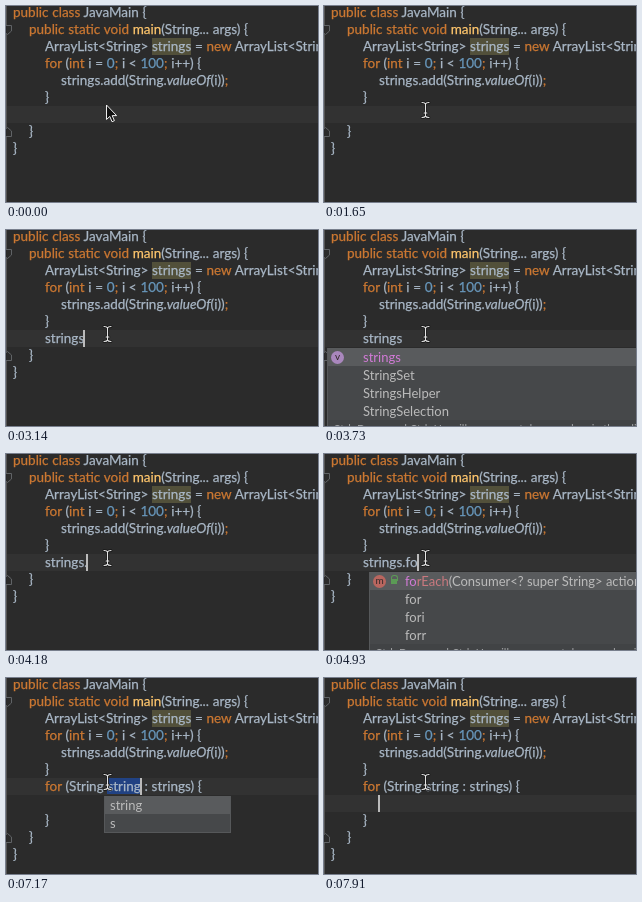
These frames come from a looping animation (312 by 196 pixels, 8 s). An HTML page:

```html
<!DOCTYPE html>
<html lang="en">
<head>
<meta charset="utf-8">
<title>Editor: postfix completion</title>
<style>
html, body { margin: 0; width: 100%; height: 100%; overflow: hidden; background: #2b2b2b; }
#stage { position: absolute; left: 0; top: 0; width: 312px; height: 196px; overflow: hidden; background: #2b2b2b; }
#stage * { box-sizing: border-box; }
#band { position: absolute; left: 0; width: 312px; height: 17px; background: #323232; }
.row { position: absolute; height: 17px; white-space: pre; color: #a9b7c6;
  font: 13.5px/17px Lato, "Open Sans", sans-serif; word-spacing: .25px; -webkit-text-stroke: .25px; }
.kw { color: #cc7832; }
.num { color: #6897bb; }
.fn { color: #ffc66d; }
.str { color: #6a8759; }
.hl { background: #52503a; display: inline-block; height: 17px; vertical-align: top; }
.sel { background: #214283; }
.caret { display: inline-block; position: relative; width: 0; height: 17px; vertical-align: top; }
.caret::after { content: ""; position: absolute; left: -1px; top: 0; width: 2px; height: 17px; background: #bbb; }
svg { position: absolute; left: 0; top: 0; }
.list { position: absolute; top: 118px; width: 340px; background: #46484a; border: 1px solid #56585a;
  border-top: 0; font: 13px/18px Lato, "Open Sans", sans-serif; color: #bbb; }
.list div { position: relative; height: 18px; white-space: pre; }
.list div:first-child { background: #595b5d; }
.list .foot { font-size: 11px; background: #414345; color: #a0a2a4; padding-left: 5px; }
.list span { margin-left: 35px; }
.list .name { margin-left: 5px; }
.list b { position: absolute; left: 3px; top: 3px; width: 13px; height: 13px; border-radius: 50%;
  background: #b9665f; color: #33282a; font: 10px/11px Lato, sans-serif; text-align: center; }
.list b.p { background: #a987bd; }
.list i { position: absolute; left: 21px; top: 7px; width: 6px; height: 5px; background: #5b9a55; }
.list i::before { content: ""; position: absolute; left: 0; top: -4px; width: 5px; height: 5px;
  border: 1px solid #5b9a55; border-bottom: 0; border-radius: 3px 3px 0 0; }
.list em { font-style: normal; color: #d17ad6; }
.list u { text-decoration: none; color: #c9797f; }
#ime { position: absolute; left: 34px; top: 121px; height: 33px; border-radius: 3px; white-space: nowrap;
  background: linear-gradient(#fbfbfb, #eceded); box-shadow: 0 0 2px #0008; padding-left: 13px;
  color: #666; font: 16px/34px Lato, "Noto Sans CJK SC", "Noto Sans CJK", sans-serif; }
#ime span { margin-right: 10.5px; }
#ime span:first-child { color: #1b90e0; }
</style>
</head>
<body>
<div id="stage">
  <div id="band"></div>
  <div id="code"></div>
  <svg width="312" height="196" fill="#2b2b2b" stroke="#606366">
    <path d="M.5 0V196" stroke="#555"/>
    <path d="M-1 19.500H5.500V25L1.500 28.500L-1 26.500"/>
    <path id="foldEnd" d="M-1 130.500H5.500V125L1.500 121.500L-1 123.500"/>
  </svg>
  <div id="popup"></div>
  <div id="ime"></div>
  <svg width="312" height="196" stroke-linejoin="round">
    <path id="arrow" d="M100.500 99V113.500L103.800 110.400L106 115.700L108.400 114.700L106.200 109.600H110.600Z" fill="#111" stroke="#eee"/>
    <g id="beam" fill="none" stroke-linecap="round">
      <path id="beamEdge" stroke="#151515" stroke-width="2.600"/>
      <path id="beamCore" stroke="#e4e4e4" stroke-width="1.100"/>
    </g>
  </svg>
</div>
<script>
const LOOP = 8000, ROW = 17, TOP = -2;
const $ = id => document.getElementById(id);
const esc = s => s.replace(/</g, '&lt;').replace(/>/g, '&gt;');
const kind = m => /\d/.test(m) ? 'num' : m === 'main' ? 'fn' : m[0] === "'" ? 'str' : 'kw';

// ~x~ marks a warning, ^x^ a selection, | the caret, _x_ italics.
function paint(text) {
  return text
    .replace(/\b(?:public|class|static|void|new|int|for)\b|\b\d+\b|'t'|\bmain\b|;|[<>]/g,
      m => /[<>]/.test(m) ? esc(m) : `<span class=${kind(m)}>${m}</span>`)
    .replace(/~(\w+)~/g, '<span class=hl>$1</span>')
    .replace(/\^(\w+)\^/g, '<span class=sel>$1</span>')
    .replace(/_(\w+)_/g, '<i>$1</i>')
    .replace('|', '<span class=caret></span>');
}

const head = [
  [0, 'public class JavaMain {'],
  [1, 'public static void main(String... args) {'],
  [2, 'ArrayList<String> ~strings~ = new ArrayList<String>();'],
  [2, 'for (int i = 0; i < 100; i++) {'],
  [3, 'strings.add(String._valueOf_(i));'],
  [2, '}']
];
const tail = [[1, '}'], [0, '}']];

const plain = text => `<span>${text}</span>`;
const variable = text => `<b class=p>v</b><span><em>${text}</em></span>`;
const method = (name, args) => `<b>m</b><i></i><span>${name}${esc(args)}</span>`;
const each = n => method(`<em>${'forEach'.slice(0, n)}</em><u>${'forEach'.slice(n)}</u>`,
  '(Consumer<? super String> action)');
const extras = ['fori', 'forr'].map(plain);
const foot = '<div class=foot>Ctrl+Down and Ctrl+Up will move caret down and up in the editor</div>';

const list = (left, rows, end = foot, style = '') =>
  `<div class=list style="left:${left}px;${style}">${rows.map(r => `<div>${r}</div>`).join('')}${end}</div>`;

const lists = {
  none: '',
  word: list(3, [variable('strings'), ...['StringSet', 'StringsHelper', 'StringSelection'].map(plain)]),
  dot: list(45, [method('add', '(String e)'), method('get', '(int index)'), method('size', '()'),
    method('stream', '()')]),
  fo: list(45, [each(2), plain('for'), ...extras]),
  for: list(45, [plain('for'), each(3), ...extras]),
  name: list(98, ['string', 's'].map(s => `<span class=name>${s}</span>`), '', 'width:127px')
};

const words = {
  s: ['是', '说', '时', '上', '少', '谁'],
  str: ['石头人', '身体乳', '受托人', '渗透乳'],
  stri: ['stri', '石头', '身体', '社团', '上头'],
  string: ['string', '石头', '身体', '社团'],
  strings: ['strings', 'string', '石头', '身体']
};

// time, edited line, completion list, input method candidates, loop body
const steps = [
  [0, ''],
  [750, '|'],
  [1650, ''],
  [1950, 's|', 'none', 's'],
  [2250, "s't'r|", 'none', 'str'],
  [2400, 'stri|', 'none', 'stri'],
  [2540, 'string|', 'none', 'string'],
  [2840, 'strings|', 'none', 'strings'],
  [3140, 'strings|'],
  [3280, 'strings|', 'word'],
  [3730, 'strings', 'word'],
  [4180, 'strings.|'],
  [4330, 'strings.|', 'dot'],
  [4930, 'strings.fo|', 'fo'],
  [5080, 'strings.for|', 'for'],
  [5680, 'strings.for', 'for'],
  [6130, 'strings.for|', 'for'],
  [6730, 'strings.for', 'for'],
  [7020, 'strings.for'],
  [7170, 'for (String ^string^| : strings) {', 'name', '', ' '],
  [7610, 'for (String ^string^ : strings) {', 'name', '', ' '],
  [7910, 'for (String string : strings) {', 'none', '', '|']
];

function show([, line, popup = 'none', ime = '', body = '']) {
  const block = body ? [[3, body], [2, '}']] : [];
  const rows = [...head, [2, line], ...block, ...tail];
  $('code').innerHTML = rows.map(([depth, text], i) =>
    `<div class=row style="left:${7 + depth * 16}px;top:${TOP + i * ROW}px">${paint(text)}</div>`).join('');
  $('band').style.top = TOP + ROW * (body === '|' ? 7 : 6) + 'px';
  $('foldEnd').setAttribute('transform', `translate(0 ${block.length * ROW})`);
  $('popup').innerHTML = lists[popup];
  $('ime').style.display = ime ? '' : 'none';
  $('ime').style.width = ime === 's' ? '267px' : '400px';
  $('ime').innerHTML = (words[ime] || []).map((w, i) => `<span>${i + 1}.${w}</span>`).join('');
}

const beam = 'M98 96.500Q101 96.500 101.500 98Q102 96.500 105 96.500M101.500 98V110M98 111.500Q101 111.500 101.500 110Q102 111.500 105 111.500M100 107H103';
$('beamEdge').setAttribute('d', beam);
$('beamCore').setAttribute('d', beam);

let current;
function frame() {
  const t = performance.now() % LOOP;
  const step = steps.findLast(s => s[0] <= t);
  if (step !== current) show(current = step);
  $('arrow').style.display = t < 600 ? '' : 'none';
  $('beam').style.display = t < 600 ? 'none' : '';
  requestAnimationFrame(frame);
}
frame();
</script>
</body>
</html>
```
